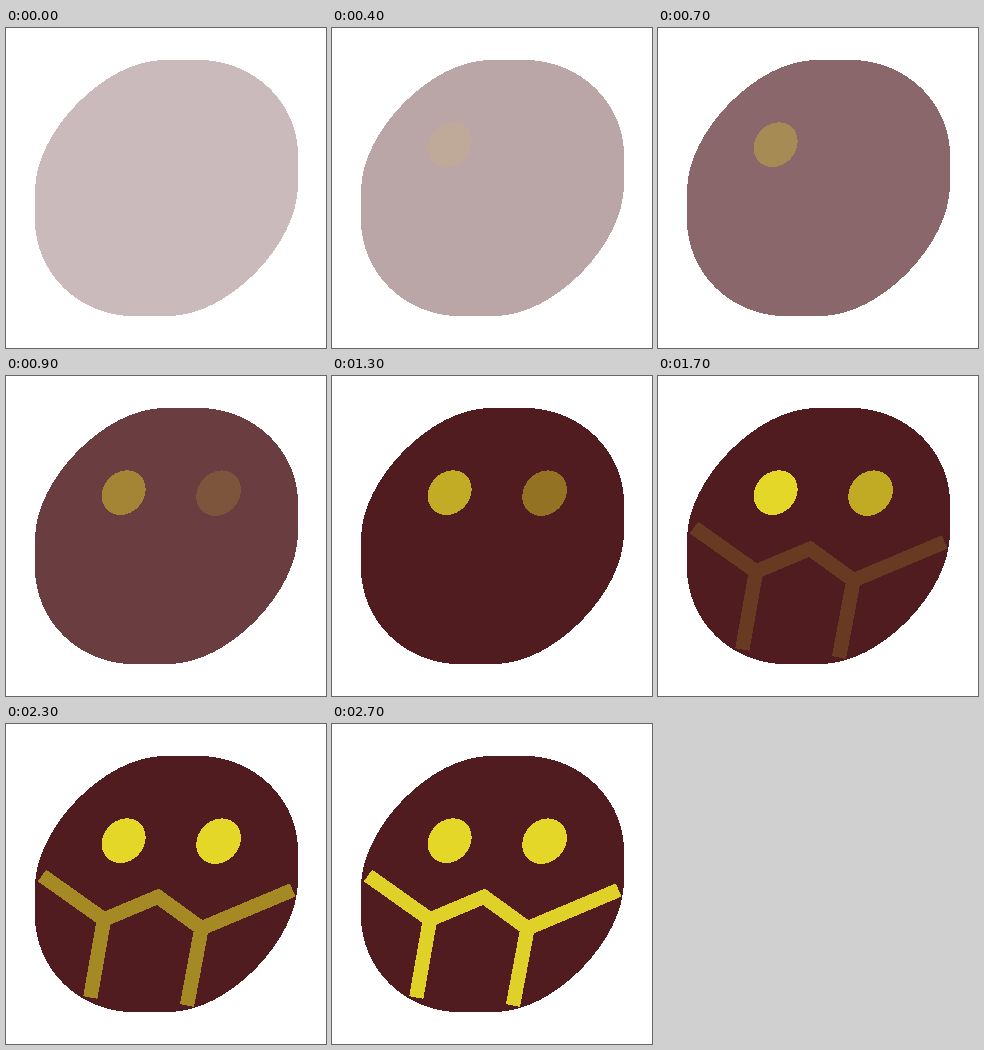
An HTML page for the animation above (2800 ms loop, 320 px wide and 320 px high).

```html
<!DOCTYPE html>
<html lang="en">
<head>
<meta charset="utf-8">
<title>Fading mask</title>
<style>
  html, body { margin: 0; width: 100%; height: 100%; overflow: hidden; background: #fff; }
  svg { display: block; width: 100%; height: 100%; }
</style>
</head>
<body>
<svg viewBox="0 0 320 320" shape-rendering="crispEdges">
  <path id="head" fill="#501c20" d="M29 163C29 104 99 32 158 32H193A99 95 0 0 1 292 127V157C292 216 222 288 163 288H127A98 96 0 0 1 29 192Z"/>
  <g fill="#e4d728">
    <ellipse id="left" rx="23.8" ry="20.4" transform="translate(117.7 116.7) rotate(-48)"/>
    <ellipse id="right" rx="24.2" ry="20.8" transform="translate(212.6 117.2) rotate(-48)"/>
  </g>
  <path id="mouth" fill="none" stroke="#e4d728" stroke-width="14.4"
    d="M36 151.5L98 195.5L152 172.8L195.5 204.3L286.7 166M98 195.5L84.3 273.5M195.5 204.3L181 281.5"/>
</svg>
<script>
const LOOP = 2800, STEP = 100;

// Opacity keys as [time, value], linear in between
const fades = {
  head: [[0, 0.3], [300, 0.3], [1065, 1]],
  left: [[200, 0.03], [300, 0.03], [500, 0.16], [1600, 1]],
  right: [[700, 0], [900, 0.155], [2000, 1]],
  mouth: [[1500, 0], [1700, 0.155], [2300, 0.58], [2700, 0.97]]
};

function valueAt(keys, t) {
  if (t < keys[0][0]) return 0;
  for (let i = 1; i < keys.length; i++) {
    const [t0, v0] = keys[i - 1], [t1, v1] = keys[i];
    if (t < t1) return v0 + (v1 - v0) * (t - t0) / (t1 - t0);
  }
  return keys[keys.length - 1][1];
}

function draw(time) {
  const t = Math.floor(time % LOOP / STEP) * STEP;
  for (const id in fades) {
    document.getElementById(id).setAttribute("opacity", valueAt(fades[id], t));
  }
}

const start = performance.now();
function tick() {
  draw(performance.now() - start);
  requestAnimationFrame(tick);
}
tick();
</script>
</body>
</html>
```
